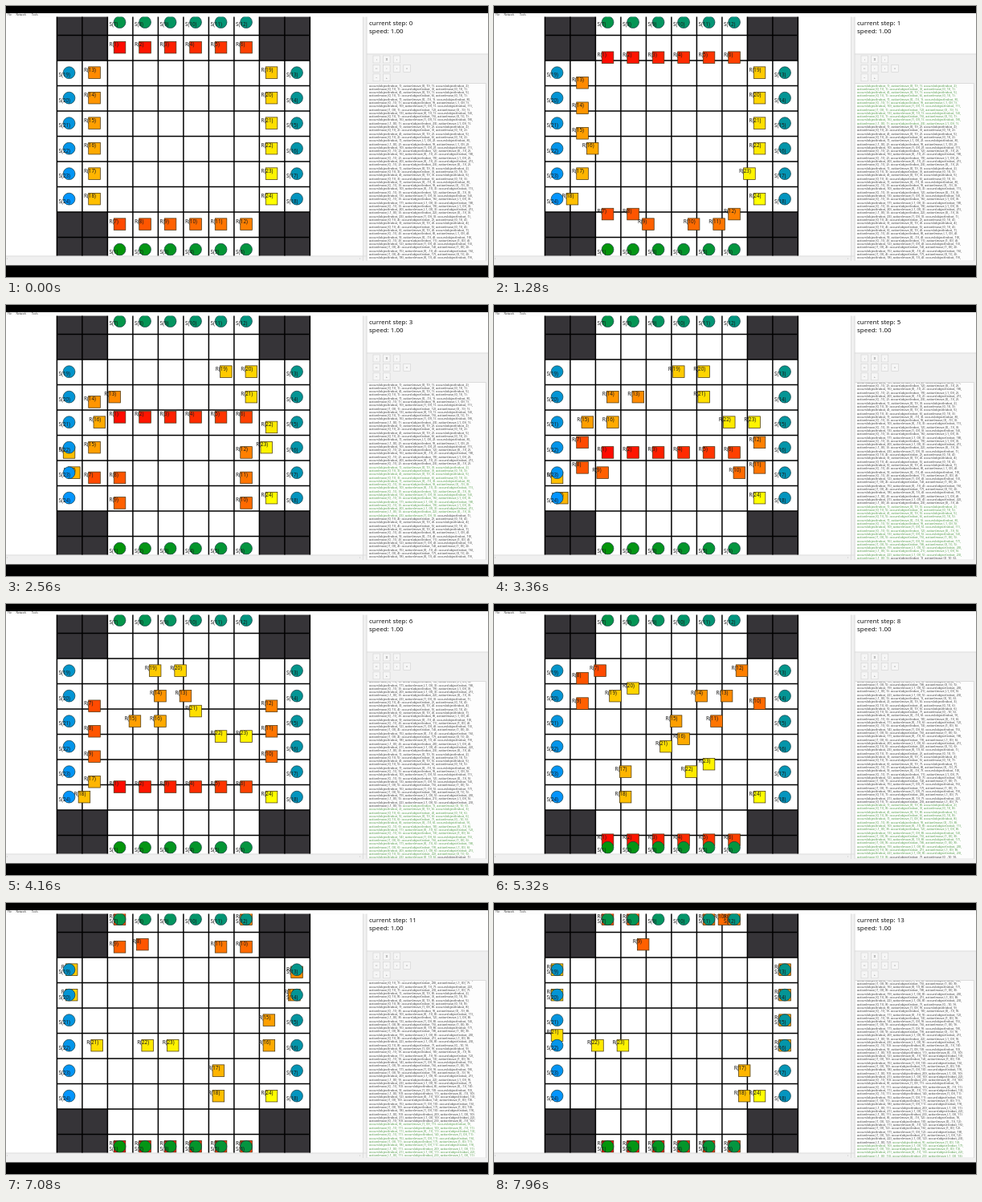
Write an HTML page that moves like this. It is 600 px wide and 338 px high and loops after 8000 ms.

```html
<!DOCTYPE html>
<html lang="en">
<head>
<meta charset="utf-8">
<title>Robot grid</title>
<style>
html, body { margin: 0; width: 100%; height: 100%; overflow: hidden; background: #000; }
#stage { position: absolute; left: 0; top: 0; width: 600px; height: 338px; overflow: hidden; }
svg { position: absolute; left: 0; top: 0; font-family: "Noto Sans", sans-serif; }
#log { position: absolute; left: 450px; top: 97px; width: 147px; height: 220px; overflow: hidden; background: #fdfdfd; }
#lines { position: absolute; left: 2px; top: .5px; width: 144px; font: 3.85px/4.3px "Noto Sans", sans-serif; color: #3c3c3c; }
#lines .on { color: #4f9a45; }
</style>
</head>
<body>
<div id="stage">
  <svg id="view" width="600" height="338" viewBox="0 0 600 338">
    <defs><clipPath id="clip"><rect x="0" y="13.5" width="444" height="298"/></clipPath></defs>
    <rect y="9" width="600" height="314.5" fill="#f0f0f0"/>
    <rect y="9" width="600" height="4.5" fill="#fff"/>
    <rect y="13.5" width="444" height="298" fill="#fff"/>
    <rect x="449.5" y="13.5" width="150.5" height="46" fill="#fff"/>
    <path d="M444.5 13.5V318M449 13.5V318M0 312H449M449 60H600M449.5 96.5H597.5V318" fill="none" stroke="#d4d4d4" stroke-width=".7"/>
    <g font-size="3.2" fill="#333"><text x="2" y="11.6">File</text><text x="12.5" y="11.6">Network</text><text x="32" y="11.6">Tools</text></g>
    <g font-size="4" fill="#999"><text x="1" y="316.3">‹</text><text x="440" y="316.3">›</text></g>
    <g id="buttons" font-size="4" fill="#777" text-anchor="middle"></g>
    <g font-size="7.95" fill="#111"><text id="step" x="452" y="23.8"></text><text x="452" y="33.9">speed: 1.00</text></g>
    <g id="board" clip-path="url(#clip)"></g>
  </svg>
  <div id="log"><div id="lines"></div></div>
</div>
<script>
const LOOP = 8000, CELL = 31.5, LEFT = 63.4, TOP = 5.1;
const DIRS = { U: [0, -1], D: [0, 1], L: [-1, 0], R: [1, 0], '.': [0, 0] };
// One letter per step for each robot; robots rest afterwards.
const ROUTES = [
  ...Array(6).fill('DDDDDDDD'),
  'ULUUUUURUU', 'ULULUUUURURU', 'LLUULUUUURURR',
  'RRUURUUUULUUL', 'RUURUULLUUUU', 'UUURUUULUU',
  'D.RRRRRRRRU', 'D.URRRRRRRR', 'D..URRRRRRRR', 'RULRRRRDRRRR',
  '..LDRURRRRRRR', 'LUUDDRRRRRRRR',
  '.LLLLLDLULL', '.ULLLLLDLLL', '.ULLLDDLLLLLU',
  '..ULLDDLLULLL', 'LURULDLDLULLL', ''
];
const STEPS = 13;
// Playback clock: [ms, steps done]
const CLOCK = [[1020, 0], [2560, 2.82], [7080, 10.91], [7960, 12.48], [8000, 12.55]];

const $ = id => document.getElementById(id);
const board = $('board');

function add(parent, tag, attrs, text) {
  const el = document.createElementNS('http://www.w3.org/2000/svg', tag);
  for (const k in attrs) el.setAttribute(k, attrs[k]);
  if (text) el.textContent = text;
  return parent.appendChild(el);
}
// Pieces sit slightly up and left of the cell centre.
const cx = col => LEFT + (col + .5) * CELL - .6;
const cy = row => TOP + (row + .5) * CELL - .7;
const shade = i => 255 * (i + 1) / 24;

// Four sides of six places each: top, bottom, left, right.
function side(name, k, inset) {
  return { top: [k + 2, inset], bottom: [k + 2, 9 - inset], left: [inset, k + 2], right: [9 - inset, k + 2] }[name];
}

function drawGrid() {
  for (const x of [0, 8]) for (const y of [0, 8])
    add(board, 'rect', { x: LEFT + x * CELL, y: TOP + y * CELL, width: 2 * CELL, height: 2 * CELL, fill: '#363438' });
  let d = '';
  for (let i = 0; i <= 10; i++)
    d += `M${LEFT + i * CELL} ${TOP}v${10 * CELL}M${LEFT} ${TOP + i * CELL}h${10 * CELL}`;
  add(board, 'path', { d, stroke: '#000', 'stroke-width': 1.5, fill: 'none' });
}

function label(parent, text, y) {
  add(parent, 'text', { x: -13, y, 'font-size': 6.3, fill: '#1a1a1a' }, text);
}

function makeRobot(route, i) {
  const start = side(['top', 'bottom', 'left', 'right'][Math.floor(i / 6)], i % 6, 1);
  const path = [start];
  for (let s = 0; s < STEPS; s++) {
    const [dx, dy] = DIRS[route[s] || '.'];
    const [x, y] = path[s];
    path.push([x + dx, y + dy]);
  }
  const node = add(board, 'g', {});
  add(node, 'rect', { x: -7.3, y: -7.3, width: 14.6, height: 14.6, fill: `rgb(255,${shade(i)},0)`, stroke: '#40300c', 'stroke-width': .7 });
  label(node, `R(${i + 1})`, -1.6);
  return { node, path };
}

function drawStation(i) {
  const [x, y] = side(['bottom', 'top', 'right', 'left'][Math.floor(i / 6)], i % 6, 0);
  const node = add(board, 'g', { transform: `translate(${cx(x)} ${cy(y)})` });
  add(node, 'circle', { r: 7.4, fill: `rgb(4,149,${shade(i)})`, stroke: '#153a40', 'stroke-width': .7 });
  label(node, `S(${i + 1})`, 5.2);
}

function drawButtons() {
  [['‹', 'II', '›'], ['‹‹', '‹', '›', '››'], ['−', '+']].forEach((row, r) => {
    row.forEach((sign, k) => {
      const x = 457 + 12.6 * k, y = 62 + 11.4 * r;
      add($('buttons'), 'rect', { x, y, width: 8.5, height: 9, fill: '#f6f6f6', stroke: '#d2d2d2', 'stroke-width': .6 });
      add($('buttons'), 'text', { x: x + 4.25, y: y + 5.9 }, sign);
    });
  });
}

function writeLog() {
  return Array.from({ length: STEPS }, (_, s) => {
    const span = document.createElement('span');
    ROUTES.forEach((route, i) => {
      const move = route[s] || '.';
      if (move !== '.')
        span.textContent += `occurs(object(robot, ${i + 1}), action(move,\u200b(${DIRS[move].join(', ')})), ${s + 1}). `;
    });
    $('lines').append(span);
    return span;
  });
}

drawGrid();
const robots = ROUTES.map(makeRobot);
for (let i = 0; i < 24; i++) drawStation(i);
drawButtons();
const spans = writeLog();
const ends = spans.map(s => s.offsetTop + s.offsetHeight);

function progress(t) {
  if (t < CLOCK[0][0]) return 0;
  const k = CLOCK.findIndex(([ms]) => t < ms);
  const [t0, p0] = CLOCK[k - 1], [t1, p1] = CLOCK[k];
  return Math.floor((p0 + (p1 - p0) * (t - t0) / (t1 - t0)) * 10) / 10;
}

let shown = -1;
function showStep(step) {
  if (step === shown) return;
  shown = step;
  $('step').textContent = 'current step: ' + step;
  spans.forEach((span, i) => span.className = i === step - 1 ? 'on' : '');
  const scroll = step ? Math.max(0, ends[step - 1] - 220) : 0;
  $('lines').style.top = .5 - scroll + 'px';
}

function render() {
  const t = performance.now() % LOOP;
  const p = progress(t), s = Math.floor(p), f = p - s;
  for (const { node, path } of robots) {
    const [x0, y0] = path[s], [x1, y1] = path[s + 1];
    node.setAttribute('transform', `translate(${cx(x0 + (x1 - x0) * f)} ${cy(y0 + (y1 - y0) * f)})`);
  }
  showStep(t < CLOCK[0][0] ? 0 : s + 1);
  requestAnimationFrame(render);
}
render();
</script>
</body>
</html>
```
